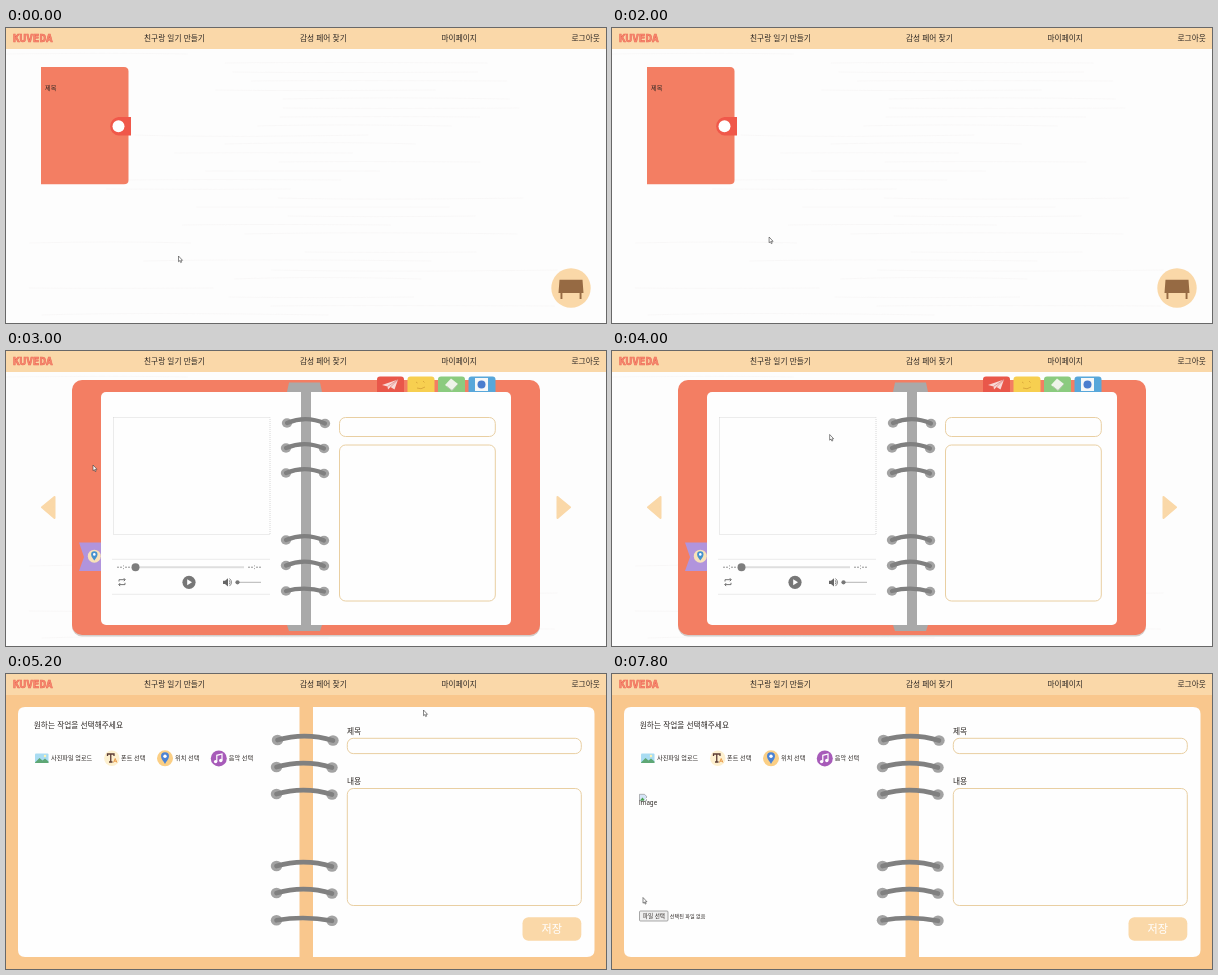
Write an HTML page that moves like this. It is 600 px wide and 295 px high and loops after 8 s.

```html
<!DOCTYPE html>
<html lang="ko">
<head>
<meta charset="utf-8">
<style>
html, body { margin: 0; width: 100%; height: 100%; overflow: hidden; background: #fdfdfd; }
svg { display: block; width: 100vw; height: 100vh; }
text { font: 500 7.7px "Noto Sans CJK KR", "Noto Sans CJK", "Noto Sans CJK JP", sans-serif; fill: #2b2623; }
.logo { font: bold 11px "DejaVu Sans Mono", monospace; fill: #f58a72; stroke: #ee6a55; stroke-width: .6px; }
.small { font-size: 6.15px; }
.field { fill: #fefefe; stroke: #e9cfa2; }
</style>
</head>
<body>
<svg viewBox="0 0 600 295">
  <defs>
    <path id="pin" d="M0 4.8C-1 2.6-3.2 1-3.2-1.4A3.2 3.2 0 0 1 3.2-1.4C3.2 1 1 2.6 0 4.8Z"/>
  </defs>
  <rect width="600" height="295" fill="#fdfdfd"/>
  <g id="grain" fill="none" stroke="#f8f6f7" stroke-width=".8"></g>

  <g id="shelf">
    <path d="M35 39H118Q122.500 39 122.500 43.500V152Q122.500 156.300 118 156.300H35Z" fill="#f37e63"/>
    <path d="M125 89H112.500a9.300 9.300 0 0 0 0 18.500H125Z" fill="#f0584a"/>
    <circle cx="112.500" cy="98.200" r="6" fill="#fff"/>
    <text class="small" x="39" y="62.300">제목</text>
    <circle cx="565" cy="260" r="19.700" fill="#fad8a8"/>
    <path d="M553.500 251.800H576.500L577.500 265H575.500V271H573.600V265H556.400V271H554.500V265H552.500Z" fill="#966a43"/>
  </g>

  <g id="diary">
    <rect x="66" y="31" width="468" height="254.500" rx="10" fill="#d3cecb"/>
    <rect x="66" y="29" width="468" height="255" rx="10" fill="#f37e63"/>
    <g id="tabs"></g>
    <path d="M385 33" fill="none"/>
    <path d="M376 34L392 28.500 388.500 38.500 384.500 36 382 38.500 381.500 35.500Z" fill="#f9d8d5"/>
    <path d="M381.500 35.500L392 28.500 384.500 36" fill="none" stroke="#d8736d" stroke-width=".6"/>
    <g fill="none" stroke="#d8a53a" stroke-width=".9"><path d="M410 31l1.500 1M417 30l1.500 1.500M411 37q4 2 8-1"/></g>
    <path d="M439 34L445 27.500 452 33 446 39.500Z" fill="#eef3e9"/>
    <path d="M441 35.500L446 39.500 452 33" fill="none" stroke="#b8c6b2"/>
    <rect x="469" y="27" width="13" height="13" fill="#f7f8f8"/>
    <circle cx="475.500" cy="33.500" r="4" fill="#4a7dce"/>
    <path d="M73 191.500H95V220H73L78 206Z" fill="#b194dc"/>
    <circle cx="88.300" cy="205.200" r="6.500" fill="#f8e2b8"/>
    <use href="#pin" x="88.300" y="204.800" fill="#4492cf"/>
    <circle cx="88.300" cy="203.400" r="1.300" fill="#fff"/>
    <rect x="95" y="41" width="410" height="233" rx="5" fill="#fefefe"/>
    <path d="M283 31.500H314L316 41H305V274H316L314 280H283L281 274H295V41H281Z" fill="#a9a9a9"/>
    <rect x="107.500" y="66.500" width="156.500" height="117" fill="none" stroke="#cfcfcf" stroke-width=".8" stroke-dasharray="1 1"/>
    <path d="M106 208.300H264M106 243.300H264" stroke="#ececec"/>
    <path d="M111 216.200h5m3 0h5M242 216.200h5m3 0h5" stroke="#888" stroke-width=".9" stroke-dasharray="2 1"/>
    <path d="M117.500 214.500v.8m0 2v.8M248.500 214.500v.8m0 2v.8" stroke="#888"/>
    <path d="M129 216.200H238" stroke="#dedede" stroke-width="2"/>
    <circle cx="129.500" cy="216.200" r="4" fill="#7d7d7d"/>
    <path d="M113 230.500V228.700H119M117.800 227.200L119.300 228.700 117.800 230.200M119 231.800V233.600H113M114.200 232.100L112.700 233.600 114.200 235.100" fill="none" stroke="#666" stroke-width=".9"/>
    <circle cx="183" cy="231.300" r="6.600" fill="#777"/>
    <path d="M181.200 228.300L186 231.300 181.200 234.300Z" fill="#fff"/>
    <path d="M217 229.700H219L222 227.200V235.400L219 232.900H217Z" fill="#666"/>
    <path d="M223.300 229.300q1.500 2 0 4M223.500 227.500q4 3.800 0 7.600" fill="none" stroke="#666" stroke-width=".8"/>
    <path d="M231 231.300H255" stroke="#b5b5b5"/>
    <circle cx="231.500" cy="231.300" r="2.100" fill="#777"/>
    <rect class="field" x="333.500" y="66.500" width="155.800" height="19" rx="6"/>
    <rect class="field" x="333.500" y="94" width="155.800" height="156" rx="6"/>
    <path d="M36 156.300L48.500 146V167ZM564 156.300L551.500 146V167Z" fill="#fad8a8" stroke="#fad8a8" stroke-width="2" stroke-linejoin="round"/>
  </g>

  <g id="editor">
    <rect width="600" height="295" fill="#f9c78d"/>
    <path d="M293.500 33H19Q12 33 12 40V276Q12 283 19 283H293.500ZM307 33H581Q588.500 33 588.500 40V276Q588.500 283 581 283H307Z" fill="#fefefe"/>
    <text x="27.800" y="54">원하는 작업을 선택해주세요</text>
    <rect x="29" y="79.500" width="13.500" height="9.500" rx="1" fill="#a9dcf2"/>
    <path d="M29 88.500L33.500 84 36.500 86.500 39 84.500 42.500 87.500V89H29Z" fill="#5ea775"/>
    <circle cx="39" cy="82" r="1.200" fill="#fff3b0"/>
    <text class="small" x="45" y="86.300">사진파일 업로드</text>
    <circle cx="105.800" cy="84.300" r="7.700" fill="#fdf0cf"/>
    <path d="M101.500 82V80H108V82M104.750 80.500V88M103 88h3.500" fill="none" stroke="#5c3c35" stroke-width="1.300"/>
    <path d="M107.500 88.500l1.700-4 1.700 4m-2.700-1.300h2" fill="none" stroke="#e8943d" stroke-width=".9"/>
    <text class="small" x="115" y="86.300">폰트 선택</text>
    <circle cx="159" cy="84.300" r="8" fill="#fbcf85"/>
    <use href="#pin" transform="translate(159 84) scale(1.250)" fill="#4b83d5"/>
    <circle cx="159" cy="82.200" r="1.700" fill="#fff"/>
    <text class="small" x="169" y="86.300">위치 선택</text>
    <circle cx="212.800" cy="84.400" r="8" fill="#a75bb9"/>
    <path d="M210.800 87.500V81.300L216 80V86.300" fill="none" stroke="#fff" stroke-width="1.200"/>
    <circle cx="209.600" cy="87.600" r="1.700" fill="#fff"/><circle cx="214.800" cy="86.500" r="1.700" fill="#fff"/>
    <text class="small" x="222.800" y="86.300">음악 선택</text>
    <text x="341" y="59.600">제목</text>
    <rect class="field" x="341.300" y="64.300" width="234" height="15.300" rx="6"/>
    <text x="341" y="110">내용</text>
    <rect class="field" x="341.300" y="114.500" width="234" height="117" rx="6"/>
    <rect x="516.500" y="243.300" width="58.800" height="23.500" rx="6" fill="#fad8a8"/>
    <text x="535.500" y="259" style="font-size:11.200px;fill:#fff">저장</text>
    <g id="upload">
      <path d="M27.500 120.300H32.500L34.500 122.300V126.800H27.500Z" fill="#d5e4f7" stroke="#888" stroke-width=".6"/>
      <path d="M28 126.500L30.500 123.500 33 126.500Z" fill="#4aa34f"/>
      <path d="M32 127.300L35 124" stroke="#fff"/>
      <text x="27" y="131.300" style="font:6.200px 'Noto Sans',sans-serif">image</text>
      <rect x="27.500" y="237" width="28.500" height="10" rx="1" fill="#efefef" stroke="#858585" stroke-width=".7"/>
      <text x="30.800" y="244" style="font-size:5.600px">파일 선택</text>
      <text x="57.800" y="243.900" style="font-size:5.100px">선택된 파일 없음</text>
    </g>
  </g>

  <rect width="600" height="21" fill="#fad8a9"/>
  <text class="logo" x="7" y="14">KUVEDA</text>
  <text x="138" y="12.700">친구랑 일기 만들기</text>
  <text x="294" y="12.700">감성 페어 찾기</text>
  <text x="435.500" y="12.700">마이페이지</text>
  <text x="565.500" y="12.700">로그아웃</text>

  <g id="cursor" fill="#fff" stroke="#3a3a3a" stroke-width=".6" stroke-linejoin="round">
    <path id="arrow" d="M0 0V5.700L1.300 4.600 2.200 6.600 3.100 6.200 2.300 4.300H4Z"/>
    <path id="hand" d="M0 .6Q.7-.4 1.400 .6V2.800L4.300 3.400Q4.800 3.600 4.700 4.500L4.200 7H.6L-1.600 4.300Q-1.500 3.300 0 4.200Z"/>
  </g>
</svg>
<script>
const $ = id => document.getElementById(id);
const LOOP = 8000, STEP = 200;
const OPEN = 3000, EDIT = 5200, UPLOAD = 7200;

// Binder rings: two holes joined by a bowed bar
function rings(page, left, width, ys, r, bow) {
  $(page).insertAdjacentHTML('beforeend', ys.map((y, i) => {
    const x = left + (i ? 0 : 1), end = x + width, b = i === 5 ? bow * .6 : bow;
    return `<g fill="#a3a3a3"><ellipse cx="${x}" cy="${y}" rx="${r * 1.1}" ry="${r}"/>
      <ellipse cx="${end}" cy="${y + .5}" rx="${r * 1.1}" ry="${r}"/></g>
      <path d="M${x} ${y}Q${x + width / 2} ${y - b} ${end} ${y + .5}" fill="none"
      stroke="#808080" stroke-width="${r * .9}" stroke-linecap="round"/>`;
  }).join(''));
}
rings('diary', 280, 38, [72, 97, 122, 189, 214.500, 240], 4.700, 8);
rings('editor', 270.500, 55.500, [66, 93, 120, 192, 219, 246.300], 5.200, 8);

$('tabs').innerHTML = ['#e9574a', '#f7cf50', '#8bcb7f', '#58a7da'].map((c, i) =>
  `<rect x="${371 + i * 30.500}" y="25.500" width="27" height="20" rx="3" fill="${c}"/>`).join('');

let seed = 7;
const rnd = () => (seed = seed * 16807 % 2147483647) / 2147483647;
for (let y = 26; y < 295; y += 9) {
  const x = rnd() * 300;
  $('grain').innerHTML += `<path d="M${x} ${y}q${60 + rnd() * 60} ${rnd() * 6 - 3} ${150 + rnd() * 150} 0"/>`;
}

// Pointer tip: time, x, y
const track = [
  [0, 172.500, 228], [600, 172.500, 228], [1400, 169, 225.500], [1800, 165, 220],
  [2800, 89, 114.500], [3000, 87, 114], [3400, 87, 114], [4800, 419, 36.500],
  [5000, 419, 36.500], [5200, 417.500, 36], [5400, 417.500, 36],
  [6600, 66, 80], [6800, 66, 85], [7400, 66, 85], [7800, 31, 223.500], [8000, 31, 223.500]
];
const hot = { shelf: [35, 39, 125, 156], diary: [371, 25, 489, 41], editor: [28, 78, 87, 91] };

function pointer(t) {
  const i = track.findIndex(k => k[0] > t);
  const [t0, x0, y0] = track[i - 1], [t1, x1, y1] = track[i];
  const u = (t - t0) / (t1 - t0), e = u * u * (3 - 2 * u);
  return [x0 + (x1 - x0) * e, y0 + (y1 - y0) * e];
}

const show = (id, on) => $(id).style.display = on ? '' : 'none';

function draw(now) {
  const t = Math.floor(now % LOOP / STEP) * STEP;
  const page = t < OPEN ? 'shelf' : t < EDIT ? 'diary' : 'editor';
  for (const id in hot) show(id, id === page);
  show('upload', t >= UPLOAD);
  const [x, y] = pointer(t), [l, top, r, b] = hot[page];
  const over = x > l && x < r && y > top && y < b;
  show('hand', over);
  show('arrow', !over);
  $('cursor').setAttribute('transform', `translate(${x} ${y})`);
}

const start = performance.now();
function tick() {
  draw(performance.now() - start);
  requestAnimationFrame(tick);
}
tick();
</script>
</body>
</html>
```
